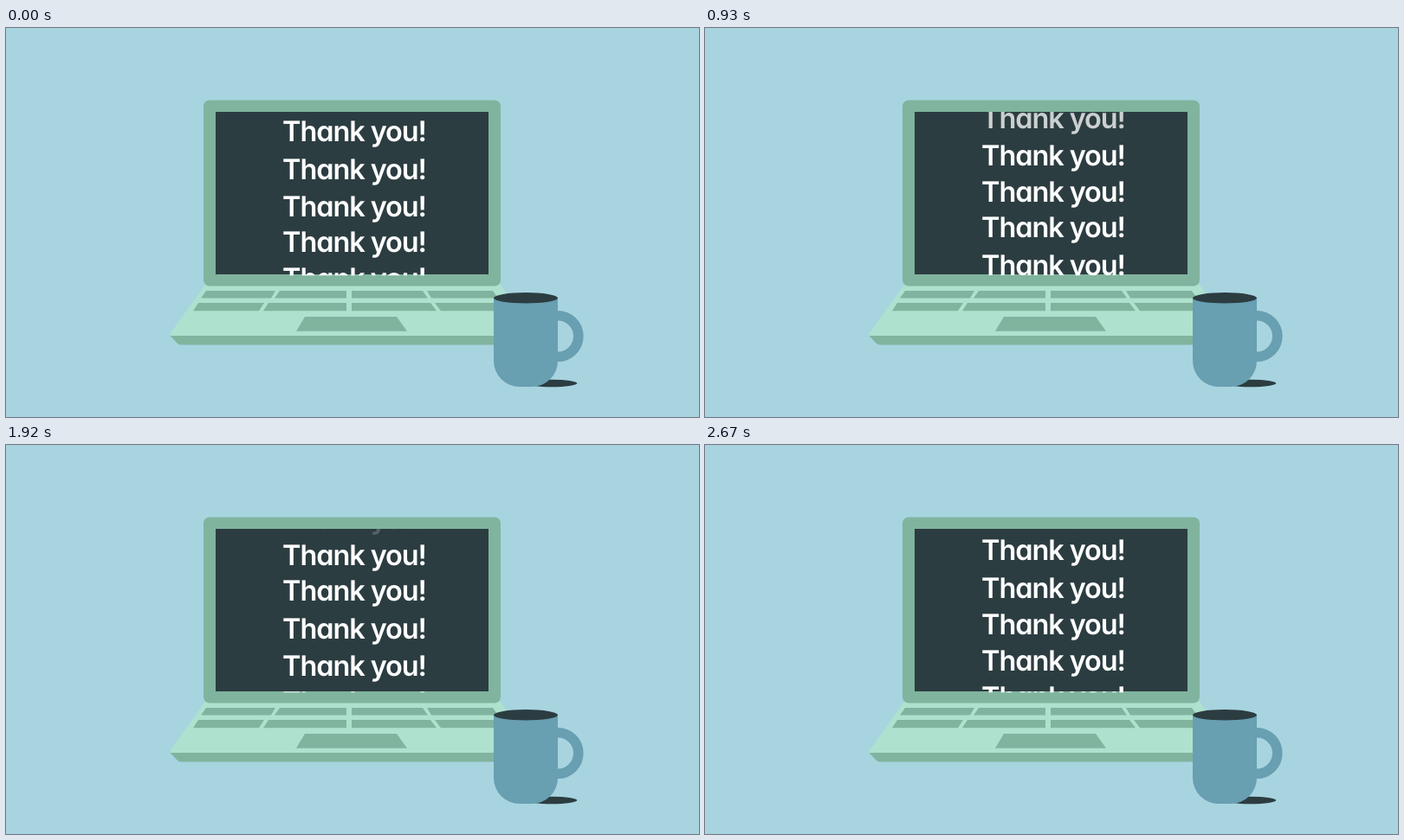
These frames come from a looping animation (800x450 px, 2.7 s). An HTML page:

```html
<!DOCTYPE html>
<html lang="en">
<head>
<meta charset="utf-8">
<title>Thank you</title>
<style>
  html, body { margin: 0; width: 100%; height: 100%; overflow: hidden; background: #a8d4e0; }
  svg { display: block; width: 800px; height: 450px; }
  text {
    font: 600 32.5px Inter, "Open Sans", sans-serif;
    font-feature-settings: "cv11";
    font-optical-sizing: none;
    letter-spacing: -1.1px;
    text-anchor: middle;
    text-rendering: geometricPrecision;
    fill: #fff;
  }
  .green { fill: #80b49e; }
  .mint { fill: #aee2ce; }
  .dark { fill: #2c3d41; }
  .blue { fill: #689fb1; }
</style>
</head>
<body>
<svg viewBox="0 0 800 450">
  <clipPath id="screen"><rect x="242" y="97" width="315" height="189.3"/></clipPath>
  <rect width="800" height="450" fill="#a8d4e0"/>

  <!-- laptop -->
  <path class="mint" d="M230 297H571L609 352Q611 356 609 357H191Q189 356 190 353Z"/>
  <path class="green" d="M189.5 356H610.5L603 364Q601 366.5 598 366.5H202Q199 366.5 197 364Z"/>
  <rect class="green" x="228" y="83.5" width="343" height="215" rx="7"/>
  <rect class="dark" x="242" y="97" width="315" height="188"/>
  <g class="green">
    <path d="M231 304H311L306 312.5H225Z M316 304H393V312.5H310Z M399 304H481L487 312.5H399Z M486 304H562L568 312.5H491Z"/>
    <path d="M222 318H298L292 327.3H216Z M303 318H393V327.3H297Z M399 318H490L497 327.3H399Z M495 318H572L578 327.3H502Z"/>
    <path d="M345 334H451L463 350.7H335Z"/>
  </g>

  <g id="lines" clip-path="url(#screen)"></g>

  <!-- mug -->
  <ellipse class="dark" cx="630" cy="411" rx="29.3" ry="4.2"/>
  <circle cx="637" cy="356.5" r="23.8" fill="none" stroke="#689fb1" stroke-width="11.6"/>
  <path class="blue" d="M563 312H637V385A30 30 0 0 1 607 415H593A30 30 0 0 1 563 385Z"/>
  <ellipse class="dark" cx="600" cy="312.3" rx="37" ry="6.2"/>
</svg>
<script>
  const LOOP = 2700, STEP = 30;
  const PERIOD = 170;                        // four lines scroll past per loop
  const OFFSETS = [119.2, 163, 205.8, 247.6];
  const BASELINE = 11.8;
  const FADE_END = 78, FADE_SPAN = 35;

  const group = document.getElementById("lines");
  const lines = Array.from({ length: 9 }, (_, i) => {
    const node = document.createElementNS("http://www.w3.org/2000/svg", "text");
    node.textContent = "Thank you!";
    node.setAttribute("x", 402);
    group.append(node);
    return { node, start: OFFSETS[i % 4] + PERIOD * Math.floor(i / 4) };
  });

  function draw(now) {
    const t = Math.floor((now % LOOP) / STEP) * STEP;
    const shift = PERIOD * t / LOOP;
    for (const { node, start } of lines) {
      const y = start - shift;
      const alpha = Math.min(1, Math.max(0, (y - FADE_END) / FADE_SPAN));
      node.setAttribute("y", (y + BASELINE).toFixed(2));
      node.setAttribute("opacity", alpha.toFixed(3));
    }
  }

  function tick() {
    draw(performance.now());
    requestAnimationFrame(tick);
  }
  tick();
</script>
</body>
</html>
```
